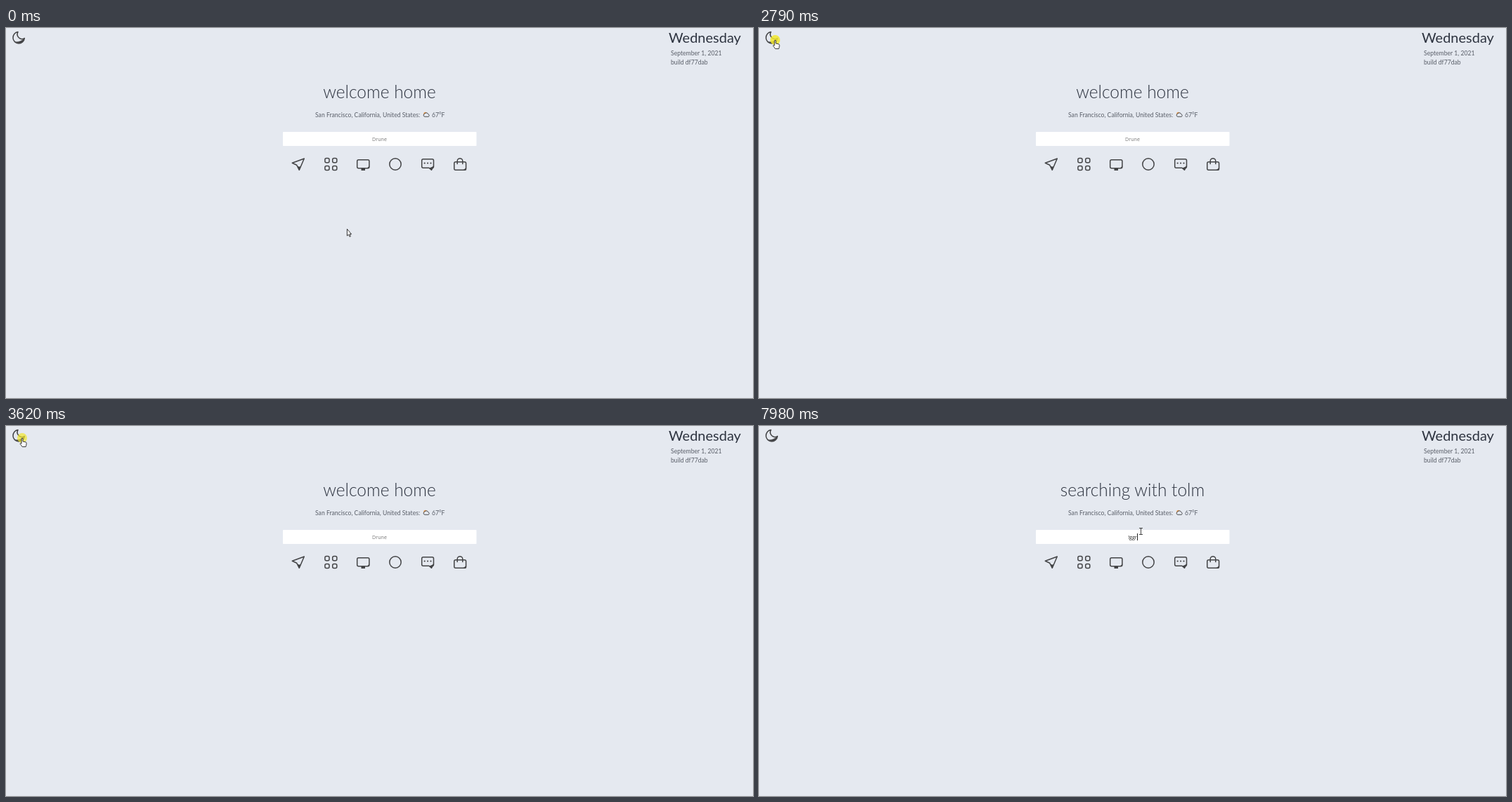
An HTML page for the animation above (8000 ms loop, 1063 by 527 pixels).

```html
<!DOCTYPE html>
<html lang="en">
<head>
<meta charset="utf-8">
<title>Start page</title>
<style>
  html, body { margin: 0; width: 100%; height: 100%; overflow: hidden; }
  svg {
    --bg: #e5e9f0; --ink: #2e3440; --soft: #5a5f69; --icon: #434446; --line: 1.5; --cloud: #e5e9f0;
    display: block; width: 100%; height: 100%; background: var(--bg);
  }
  svg.dark { --bg: #2e3440; --ink: #e5e9f0; --soft: #d3d7de; --icon: #b4b6b9; --line: 1.3; --cloud: #f4f4f2; }
  text { font: 8.65px Lato, "Open Sans", sans-serif; fill: var(--soft); }
  .mid { text-anchor: middle; }
  #title { font-size: 24.5px; font-weight: 300; fill: var(--ink); }
  #day { font-size: 20px; fill: var(--ink); }
  #menu .hover { fill: #c6cad1; }
  #query { font: 7.1px "Open Sans", "Noto Sans", sans-serif; fill: #222; }
  #query.hint { fill: #757575; }
  .icon { fill: none; stroke: var(--icon); stroke-width: var(--line); stroke-linejoin: round; stroke-linecap: round; }
  .solid { fill: var(--icon); stroke: none; }
  .pointer { fill: #fff; stroke: #222; stroke-width: .9; stroke-linejoin: round; }
</style>
</head>
<body>
<svg id="stage" viewBox="0 0 1063 527" preserveAspectRatio="none">
  <rect width="1063" height="527" style="fill:var(--bg)"/>

  <g id="moon" class="icon">
    <path d="M17 5.6A8.2 8.2 0 1 0 26.3 14.6A6.7 6.7 0 0 1 17 5.6Z"/>
    <path class="solid" d="M13 19.2Q19 21 26.300 14.600Q24.500 21.500 18 21.400Q15 21.300 13 19.200Z"/>
  </g>
  <g id="sun" class="icon"><circle cx="18.700" cy="14" r="3.900"/></g>

  <text id="day" x="943" y="21.300">Wednesday</text>
  <text x="946" y="39">September 1, 2021</text>
  <text x="946" y="52.200">build df77dab</text>

  <g id="page">
    <text id="title" class="mid" x="531.500" y="100"></text>
    <text x="440" y="127">San Francisco, California, United States:</text>
    <circle cx="596.800" cy="122.200" r="2.500" fill="#e0954a"/>
    <path d="M596 126.300a2.100 2.100 0 0 1 -.3-4.100a2.900 2.900 0 0 1 5.200 .7a1.800 1.800 0 0 1 .2 3.400Z"
      style="fill:var(--cloud)" stroke="#3d3e41" stroke-width=".9"/>
    <text x="606" y="127">67°F</text>
    <rect x="394" y="148" width="275.500" height="20" rx=".8" fill="#fff"/>
    <text id="query" class="mid" x="531.500" y="160.500"></text>
    <rect id="caret" y="153" width="1" height="10" fill="#222"/>

    <g class="icon">
      <path d="M424.300 186L407.300 192.300L413.800 195.300L417.300 202.300Z"/>
      <path class="solid" d="M414.500 196.500Q417.500 198 419.800 197L417.300 202.600Z"/>
      <g id="tiles"></g>
      <rect x="499.700" y="187.800" width="17.200" height="11.900" rx="2"/>
      <path class="solid" d="M517 195.500V198Q517 200 515 200H511.500Q516 199 517 195.500ZM505.500 200H511V203H505.500Z"/>
      <circle cx="554" cy="194" r="8.200"/>
      <path d="M593.700 186.800H606.500Q608.500 186.800 608.500 188.800V197.300Q608.500 199.300 606.500 199.300H605.500V202.300L602 199.300H593.700Q591.700 199.300 591.700 197.300V188.800Q591.700 186.800 593.700 186.800Z"/>
      <path class="solid" d="M608.500 195.500V199L605.500 203L602 199.300Q607 198.800 608.500 195.500Z"/>
      <g id="dots"></g>
      <rect x="637.800" y="190.700" width="16.800" height="11.600" rx="2"/>
      <path d="M642.200 193.500V189.500A3.800 3.800 0 0 1 649.800 189.500V193.500"/>
      <path class="solid" d="M654.700 197.500V202.500H649Q653.800 201.500 654.700 197.500Z"/>
    </g>
    <g id="menu" class="mid"></g>
  </g>

  <circle id="click" r="7" fill="#f2e72c"/>
  <g id="cursor">
    <path id="arrow" class="pointer" d="M.4 .3V10L2.500 8.100L4 11.300L5.400 10.700L4 7.600H6.600Z"/>
    <path id="hand" class="pointer" d="M-.9 8V1Q0 -.6 1 1V5L5 5.900Q6.200 6.300 6.100 7.600Q6 10.500 5.100 12.600H.2Q-1 10.800 -2.900 8.400Q-2.700 6.500 -.9 8Z"/>
    <path id="beam" d="M-2 -4.500H3M.5 -4.500V4.500M-2 4.500H3" fill="none" stroke="#333" stroke-width=".9"/>
  </g>
</svg>

<script>
const LOOP = 8000;
const $ = id => document.getElementById(id);
const show = (id, on) => $(id).style.display = on ? '' : 'none';

function add(parent, tag, attrs, text = '') {
  const el = document.createElementNS('http://www.w3.org/2000/svg', tag);
  for (const key in attrs) el.setAttribute(key, attrs[key]);
  el.textContent = text;
  parent.append(el);
  return el;
}

// Static repeats
for (let i = 0; i < 4; i++) {
  add($('tiles'), 'rect', {
    x: 453.9 + (i % 2) * 10.8, y: 185.6 + (i >> 1) * 10.8, width: 6.1, height: 6.1, rx: 2
  });
}
for (let i = 0; i < 3; i++) add($('dots'), 'circle', { class: 'solid', cx: 595.7 + i * 4.4, cy: 192.5, r: 1.1 });
for (let i = 0; i < 8; i++) {
  const a = i * Math.PI / 4;
  add($('sun'), 'circle', { class: 'solid', cx: 18.7 + 8 * Math.cos(a), cy: 14 + 8 * Math.sin(a), r: 1.2 });
}

const ROW = 18.8;
const links = ['Tinker Post', 'Mordel.ea', 'OrnVib', 'LateralGorge', 'r/BixOrm', 'TuNook', 'Dashboard', 'Where Is LAN']
  .map((name, i) => add($('menu'), 'text', { x: 510.6, y: 225 + i * ROW }, name));

// Cursor stops: time, x, y, and the easing used on the way there
const linear = u => u;
const smooth = u => u * u * (3 - 2 * u);
const path = [
  [0, 485, 286], [560, 485, 286, linear], [870, 509, 189.5, smooth],
  [1140, 509, 189.5, linear], [1380, 513, 250, linear], [1860, 509, 355.5, linear],
  [1980, 509, 355.5, linear], [2570, 23, 17, smooth],
  [3640, 23, 17, linear], [4340, 562, 252, smooth],
  [4360, 562, 252, linear], [4700, 543, 150, smooth], [LOOP, 543, 150, linear]
];

function cursorAt(t) {
  const i = path.findIndex((p, k) => k > 0 && t <= p[0]);
  const [t0, x0, y0] = path[i - 1];
  const [t1, x1, y1, ease] = path[i];
  const u = ease((t - t0) / (t1 - t0));
  return [x0 + (x1 - x0) * u, y0 + (y1 - y0) * u];
}

// Latest entry whose time has passed
const latest = (list, t) => list.filter(e => e[0] <= t).pop()[1];

const typed = [
  [0, ''], [5110, '!'], [5190, '!p'], [5390, '!pe'], [5480, '!pel'],
  [5880, '!pe'], [5920, '!p'], [6360, '!'],
  [6520, '!t'], [6590, '!to'], [6660, '!tol'], [6760, '!tolm'],
  [7090, '!'], [7860, '!g'], [7920, '!gg'], [7980, '!ggr']
];
const titles = [
  [0, 'welcome home'], [5590, 'searching with pelora'], [6760, 'searching with tolm']
];
const carets = [
  [0, false], [4740, true], [6080, false], [6360, true], [7420, false], [7810, true]
];
const clicks = [
  [0, 0], [2790, .85], [2870, 0], [3570, .8], [3620, .7], [3650, 0], [4700, .8], [4780, 0]
];

function draw(t) {
  const [x, y] = cursorAt(t);
  const dark = t >= 2820 && t < 3620;
  $('stage').classList.toggle('dark', dark);
  $('page').setAttribute('transform', `translate(0 ${dark ? 1 : 0})`);
  show('moon', !dark);
  show('sun', dark);

  const open = t < 2570 && x >= 481 && x <= 540 && (t > 860 || y < 204);
  const row = Math.floor((y - 213) / ROW);
  show('menu', open);
  links.forEach((el, i) => el.classList.toggle('hover', open && i === row));

  const text = latest(typed, t);
  $('title').textContent = latest(titles, t);
  $('query').textContent = text || 'Drune';
  $('query').classList.toggle('hint', !text);
  const width = text ? $('query').getComputedTextLength() : 0;
  $('caret').setAttribute('x', Math.round(531.5 + width / 2));
  show('caret', latest(carets, t));

  const inField = x > 394 && x < 669 && y > 148 && y < 168;
  const overLink = open || (x < 29 && y < 24);
  show('beam', inField);
  show('hand', overLink);
  show('arrow', !inField && !overLink);
  $('cursor').setAttribute('transform', `translate(${x} ${y})`);

  $('click').setAttribute('cx', x);
  $('click').setAttribute('cy', y);
  $('click').setAttribute('opacity', latest(clicks, t));
}

const start = performance.now();
function tick() {
  draw((performance.now() - start) % LOOP);
  requestAnimationFrame(tick);
}
tick();
</script>
</body>
</html>
```
